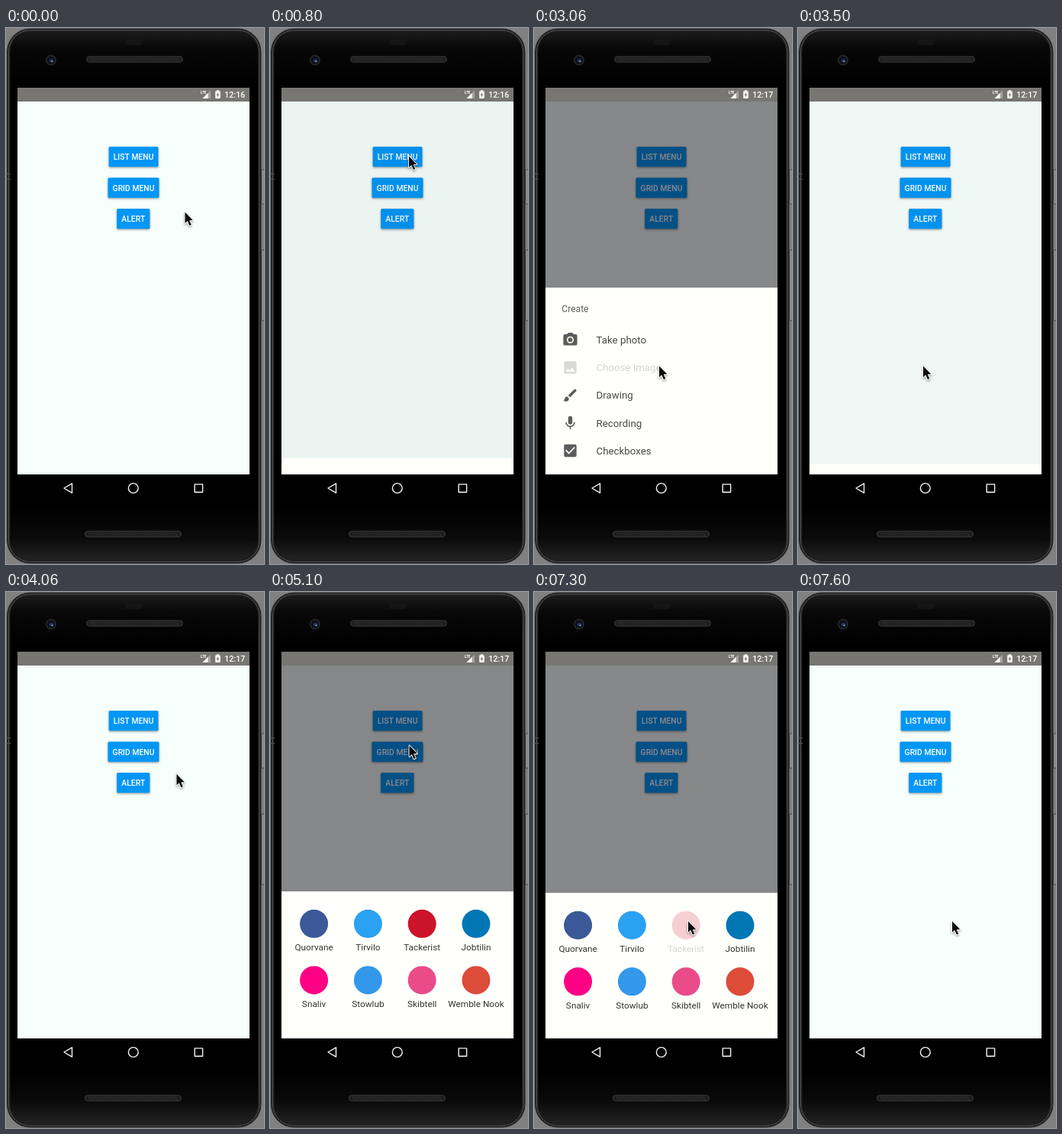
An HTML page with a canvas that plays this animation: 338x700 px, repeating every 8000 ms.

```html
<!DOCTYPE html>
<html lang="en">
<head>
<meta charset="utf-8">
<title>Bottom sheet demo</title>
<style>
  html, body { margin: 0; width: 100%; height: 100%; overflow: hidden; background: #808080; }
  canvas { display: block; width: 338px; height: 700px; }
</style>
</head>
<body>
<canvas id="stage"></canvas>
<script>
const W = 338, H = 700, LOOP = 8000;
const SCREEN = { x: 15, y: 78, w: 304, h: 505, top: 96, bottom: 583 };
const canvas = document.getElementById('stage');
const dpr = window.devicePixelRatio || 1;
canvas.width = W * dpr;
canvas.height = H * dpr;
const ctx = canvas.getContext('2d');

const BUTTONS = [
  ['LIST MENU', 134.7, 155, 64.8],
  ['GRID MENU', 133.5, 195.5, 67],
  ['ALERT', 145.2, 236, 43.2]
];
const ROWS = [
  ['Take photo', cameraIcon], ['Choose image', imageIcon], ['Drawing', brushIcon],
  ['Recording', micIcon], ['Checkboxes', checkIcon]
];
const APPS = [
  ['Quorvane', '#3b5998'], ['Tirvilo', '#2aa1f1'], ['Tackerist', '#cb1329'], ['Jobtilin', '#0077b5'],
  ['Snaliv', '#ff0084'], ['Stowlub', '#3398ea'], ['Skibtell', '#ea4c89'], ['Wemble Nook', '#dd4b39']
];
const SHEETS = [
  { top: 339, open: 740, close: 3245, press: 3050, item: 1, draw: listSheet },
  { top: 391, open: 4710, close: 7284, press: 7150, item: 2, draw: gridSheet }
];
// start, end, target x, y, optional control point for curved moves
const START = [234.5, 240.5];
const MOVES = [
  [10, 460, 182, 167.5],
  [1190, 1800, 206.5, 334, 205.5, 250],
  [2180, 3000, 164, 441.5],
  [3680, 4400, 182.5, 200.5, 304, 274],
  [5540, 6060, 216.5, 310],
  [6340, 6860, 202, 430]
];

const clamp = v => Math.max(0, Math.min(1, v));
const smooth = u => u * u * (3 - 2 * u);
const easeOut = u => 1 - (1 - u) ** 2;
const easeInOut = u => u < .5 ? (2 * u) ** 1.8 / 2 : 1 - (2 - 2 * u) ** 1.8 / 2;

function box(x, y, w, h, r, fill, stroke, lw = 1) {
  ctx.beginPath();
  ctx.roundRect(x, y, w, h, r);
  if (fill) { ctx.fillStyle = fill; ctx.fill(); }
  if (stroke) { ctx.strokeStyle = stroke; ctx.lineWidth = lw; ctx.stroke(); }
}

function disc(x, y, r, fill) {
  ctx.beginPath();
  ctx.arc(x, y, r, 0, 7);
  ctx.fillStyle = fill;
  ctx.fill();
}

function poly(pts, fill, stroke, lw) {
  ctx.beginPath();
  pts.forEach(p => ctx.lineTo(p[0], p[1]));
  ctx.closePath();
  if (stroke) { ctx.strokeStyle = stroke; ctx.lineWidth = lw; ctx.lineJoin = 'round'; ctx.stroke(); }
  if (fill) { ctx.fillStyle = fill; ctx.fill(); }
}

function text(s, x, y, size, color, align = 'left', weight = 400) {
  ctx.font = `${weight} ${size}px Roboto, sans-serif`;
  ctx.textAlign = align;
  ctx.fillStyle = color;
  ctx.fillText(s, x, y);
}

function gradient(y0, y1, ...stops) {
  const g = ctx.createLinearGradient(0, y0, 0, y1);
  stops.forEach(([p, c]) => g.addColorStop(p, c));
  return g;
}

function grille(x, y) {
  box(x, y, 126, 7.5, 3.75, '#1d1d1d', '#3d3d3d');
  ctx.fillStyle = '#343434';
  for (let i = 0; i < 39; i++) {
    ctx.fillRect(x + 4 + i * 3, y + 2, 1.5, 1.5);
    ctx.fillRect(x + 5.5 + i * 3, y + 4.2, 1.5, 1.5);
  }
}

function phone() {
  ctx.fillStyle = '#808080';
  ctx.fillRect(0, 0, W, H);
  box(334.5, 185, 5, 45, 1, '#8a8a8a', '#444');
  box(334.5, 290, 5, 92, 1, '#8a8a8a', '#444');
  // dark outer edge, metal rim, then the glass front
  box(1.5, 1, 332.5, 698, 30, '#1b1b1b', '#2a2a2a');
  box(3.5, 3, 328.5, 694, 28, null, '#585858');
  box(5, 4.5, 325.5, 690.5, 26.5,
    gradient(4, 695, [0, '#1c1c1c'], [.03, '#080808'], [.1, '#000'], [.9, '#000'], [.96, '#0b0b0b'], [1, '#232323']),
    '#1e1e1e');
  ctx.fillStyle = '#555';
  ctx.fillRect(0, 190, 6, 1);
  ctx.fillRect(0, 197, 6, 1);

  box(156.5, 14.5, 23, 8, 4, '#151518');
  grille(105.5, 37.2);
  grille(103.5, 657.2);
  disc(59, 42, 7, '#26262a');
  disc(59, 42, 5.2, '#0d0f18');
  disc(59.5, 42.5, 2.6, '#222f5c');
  disc(60.5, 43.5, 1.1, '#8f9fd0');

  poly([[76, 601], [86.5, 594.8], [86.5, 607.2]], null, '#f4f4f4', 1.4);
  ctx.beginPath();
  ctx.arc(166.8, 601, 6.4, 0, 7);
  ctx.stroke();
  ctx.strokeRect(247.2, 595.9, 10.4, 10.4);
}

function statusBar(t) {
  ctx.fillStyle = '#777672';
  ctx.fillRect(SCREEN.x, SCREEN.y, SCREEN.w, 18);
  text('LTE', 255, 86.3, 4.6, '#fff', 'left', 700);
  poly([[268, 81.5], [268, 92], [257.5, 92]], 'rgba(255,255,255,.35)');
  poly([[264.5, 85], [264.5, 92], [257.5, 92]], '#fff');
  box(274.2, 82.5, 6.6, 9.6, .8, '#fff');
  ctx.fillRect(276, 81.3, 3, 1.5);
  poly([[278.2, 83.8], [275.6, 88], [277.2, 88], [276.8, 91], [279.4, 86.7], [277.8, 86.7]], '#777672');
  text(t < 1000 ? '12:16' : '12:17', 313.2, 91, 10.6, '#fff', 'right', 500);
}

function buttons() {
  for (const [label, x, y, w] of BUTTONS) {
    ctx.save();
    ctx.shadowColor = 'rgba(0,0,0,.38)';
    ctx.shadowBlur = 3 * dpr;
    ctx.shadowOffsetY = 1.2 * dpr;
    box(x, y, w, 26.3, 1.5, '#0296f5');
    ctx.restore();
    text(label, x + w / 2, y + 17.2, 10.36, '#fff', 'center', 500);
  }
}

// Icons use a 24 unit box.
const INK = '#5c5c5c';
const PAPER = '#fffffc';

function cameraIcon() {
  box(2, 4, 20, 16, 2, INK);
  poly([[7, 4.2], [9, 2], [15, 2], [17, 4.2]], INK);
  disc(12, 12, 5, PAPER);
  disc(12, 12, 3.2, INK);
}

function imageIcon() {
  box(3, 3, 18, 18, 2, INK);
  poly([[8.5, 13.5], [11, 16.5], [14.5, 12], [19, 18], [5, 18]], PAPER);
}

function brushIcon() {
  ctx.fillStyle = INK;
  ctx.fill(new Path2D('M7 14c-1.7 0-3 1.3-3 3 0 1.3-1.2 2-2 2 .9 1.2 2.5 2 4 2 2.2 0 4-1.8 4-4 0-1.7-1.3-3-3-3z'));
  ctx.fill(new Path2D('M20.7 4.6l-1.3-1.3c-.4-.4-1-.4-1.4 0L9 12.2 11.8 15l8.9-9c.4-.4.4-1 0-1.4z'));
}

function micIcon() {
  box(9, 2, 6, 12, 3, INK);
  ctx.beginPath();
  ctx.arc(12, 10.9, 6.1, 0, Math.PI);
  ctx.moveTo(12, 17);
  ctx.lineTo(12, 21);
  ctx.strokeStyle = INK;
  ctx.lineWidth = 1.8;
  ctx.stroke();
}

function checkIcon() {
  box(3, 3, 18, 18, 2, INK);
  ctx.beginPath();
  ctx.moveTo(5.7, 11.3);
  ctx.lineTo(10, 15.6);
  ctx.lineTo(18.3, 7.3);
  ctx.strokeStyle = PAPER;
  ctx.lineWidth = 2;
  ctx.lineJoin = 'miter';
  ctx.stroke();
}

function listSheet(pressed) {
  text('Create', 36.3, 370.8, 12.1, '#626262');
  ROWS.forEach(([label, icon], i) => {
    const y = 407.2 + i * 36.2;
    ctx.save();
    ctx.translate(47.5, y);
    ctx.scale(.91, .91);
    ctx.translate(-12, -12);
    icon();
    ctx.restore();
    text(label, 81.5, y + 4.8, 13.32, '#484848');
    if (i === pressed) {
      ctx.fillStyle = 'rgba(255,255,252,.77)';
      ctx.fillRect(34, y - 14, 150, 28);
    }
  });
}

function gridSheet(pressed) {
  APPS.forEach(([label, color], i) => {
    const x = 57.6 + i % 4 * 70.8, y = 433.3 + (i > 3 ? 73.6 : 0);
    ctx.save();
    if (i === pressed) ctx.globalAlpha = .2;
    disc(x, y, 18.5, color);
    text(label, x, y + 34.8, 11.84, '#333', 'center');
    ctx.restore();
  });
}

function drawSheet(s, t) {
  const shown = easeInOut(clamp((t - s.open) / 320)) - easeInOut(clamp((t - s.close) / 300));
  if (shown <= 0) return;
  ctx.save();
  ctx.beginPath();
  ctx.rect(SCREEN.x, SCREEN.top, SCREEN.w, SCREEN.bottom - SCREEN.top);
  ctx.clip();
  ctx.fillStyle = `rgba(8,0,8,${.47 * shown})`;
  ctx.fillRect(SCREEN.x, SCREEN.top, SCREEN.w, SCREEN.h);
  ctx.translate(0, (SCREEN.bottom - s.top) * (1 - shown));
  ctx.fillStyle = PAPER;
  ctx.fillRect(SCREEN.x, s.top, SCREEN.w, SCREEN.bottom - s.top);
  s.draw(t >= s.press ? s.item : -1);
  ctx.restore();
}

function cursorAt(t) {
  let [x, y] = START;
  for (const [t0, t1, ex, ey, cx, cy] of MOVES) {
    if (t <= t0) break;
    const u = clamp((t - t0) / (t1 - t0));
    const curved = cx !== undefined;
    const p = curved ? easeOut(u) : smooth(u), q = 1 - p;
    const mix = (a, c, b) => curved ? q * q * a + 2 * p * q * c + p * p * b : q * a + p * b;
    x = mix(x, cx, ex);
    y = mix(y, cy, ey);
  }
  return [x, y];
}

function cursor(t) {
  const shape = [[0, 0], [0, 14.6], [3.3, 11.6], [5.9, 17.6], [8.3, 16.6], [5.7, 10.8], [10.3, 10.6]];
  ctx.save();
  ctx.translate(...cursorAt(t));
  ctx.shadowColor = 'rgba(0,0,0,.4)';
  ctx.shadowBlur = 3 * dpr;
  ctx.shadowOffsetY = 1.5 * dpr;
  poly(shape, null, '#fff', 1.8);
  ctx.shadowColor = 'transparent';
  poly(shape, '#0a0a0a');
  ctx.restore();
}

function frame(now) {
  const t = now % LOOP;
  ctx.setTransform(dpr, 0, 0, dpr, 0, 0);
  phone();
  ctx.fillStyle = '#f6fffc';
  ctx.fillRect(SCREEN.x, SCREEN.y, SCREEN.w, SCREEN.h);
  statusBar(t);
  buttons();
  SHEETS.forEach(s => drawSheet(s, t));
  cursor(t);
  requestAnimationFrame(frame);
}

frame(performance.now());
</script>
</body>
</html>
```
